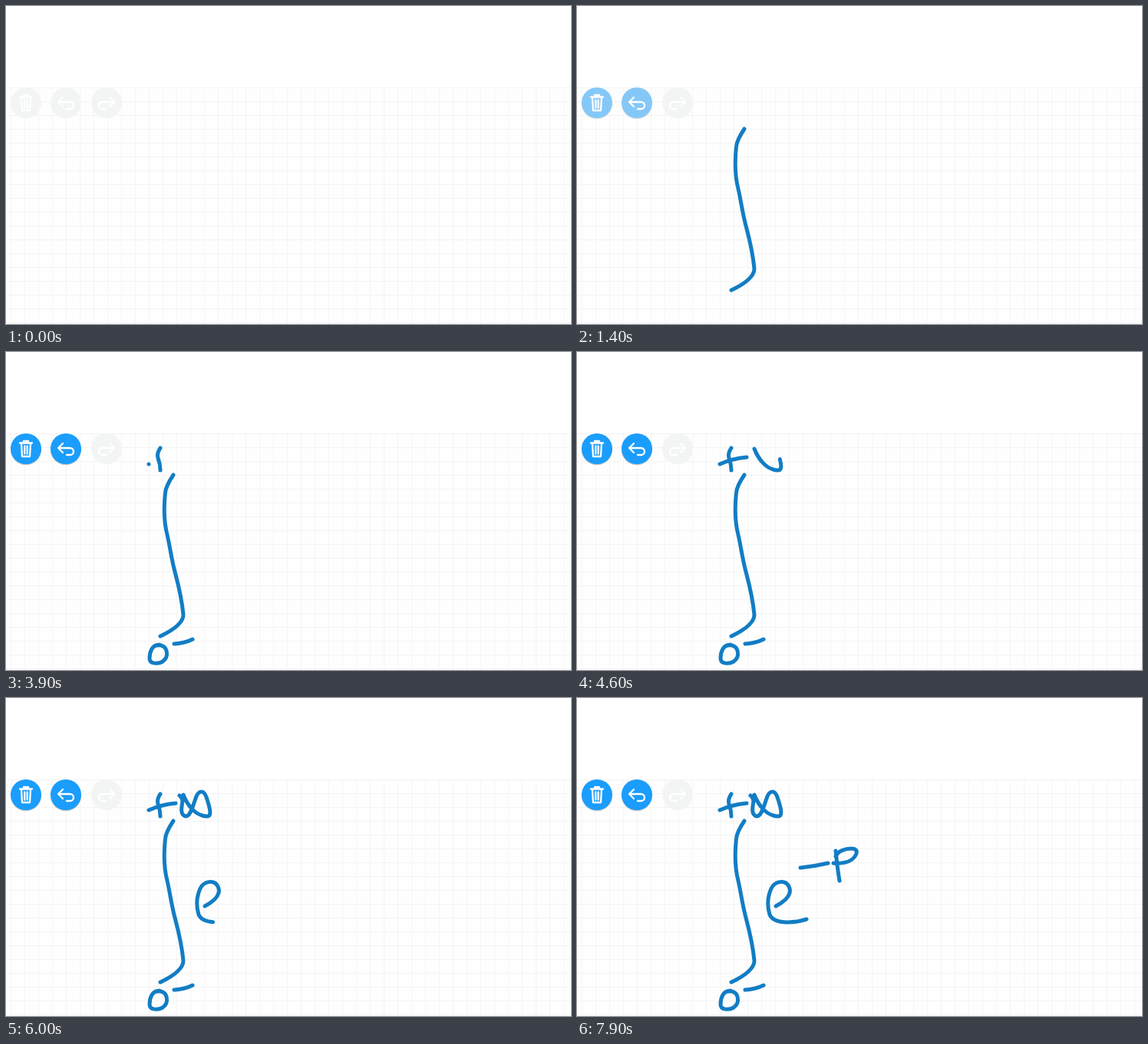
An HTML page that plays this animation: 736x414 px, repeating every 8000 ms.

```html
<!DOCTYPE html>
<html lang="en">
<head>
<meta charset="utf-8">
<title>Handwriting board</title>
<style>
  html, body { margin: 0; width: 100%; height: 100%; overflow: hidden; background: #fff; }
  svg { display: block; width: 100%; height: 100%; }
  path { fill: none; stroke-linecap: round; stroke-linejoin: round; }
  #ink path { stroke: #127dc4; stroke-width: 5; }
  .icon path { stroke: #fff; stroke-width: 2.3; }
</style>
</head>
<body>
<svg viewBox="0 0 736 414">
  <defs>
    <g id="trash" class="icon">
      <path d="M18 118.5H34M23 118V116H29V118M20 119L21 136H31L32 119M24.3 122.5V132.5M27.7 122.5V132.5"/>
    </g>
    <g id="arrow" class="icon">
      <path d="M74 119L68 125L74 131M68 125H83.5A4.5 4.5 0 0 1 83.5 134H79"/>
    </g>
  </defs>
  <rect y="106" width="736" height="308" fill="#fefefe"/>
  <path id="columns" stroke="#f5f5f5" stroke-linecap="butt"/>
  <path id="rows" stroke="#f3f3f3" stroke-linecap="butt"/>
  <g fill="#f3f5f5">
    <circle cx="26" cy="126" r="20"/>
    <circle cx="78" cy="126" r="20"/>
    <circle cx="131" cy="126" r="20"/>
  </g>
  <g id="active" fill="#1a9dfc">
    <g fill="#000" opacity=".2">
      <circle cx="26" cy="127.3" r="20"/>
      <circle cx="78" cy="127.3" r="20"/>
    </g>
    <circle cx="26" cy="126" r="20"/>
    <circle cx="78" cy="126" r="20"/>
  </g>
  <use href="#trash"/>
  <use href="#arrow"/>
  <use href="#arrow" transform="translate(209) scale(-1 1)"/>
  <g id="ink"></g>
</svg>
<script>
const LOOP = 8000, STEP = 100, CELL = 18;
const byId = id => document.getElementById(id);

let rows = '', columns = '';
for (let y = 106.5; y < 414; y += CELL) rows += `M0 ${y}H736`;
for (let x = 6.5; x < 736; x += CELL) columns += `M${x} 106V414`;
byId('rows').setAttribute('d', rows);
byId('columns').setAttribute('d', columns);

// Pen touches at `down`, moves from `from`, and is complete at `to` (ms).
const strokes = [
  { down: 600, from: 800, to: 1300, d: 'M218 160Q208 175 207.5 183C205 205 206 222 210 238C214 255 215 268 221 290C225 305 229 322 231 342C231 352 220 361 201 370' },
  { down: 2100, from: 2100, to: 2400, d: 'M200 381C190 381 187 391 187 399C187 407 199 406 204 403C208 400 210 396 209.5 392C209 383 202 380 193 383' },
  { down: 2700, from: 2800, to: 2900, d: 'M219 380Q233 379 243 374' },
  { down: 3600, from: 3800, to: 3800, d: 'M201 125Q196 132 198 138Q201 146 201 154' },
  { down: 3900, from: 4100, to: 4100, d: 'M186 146Q201 139 221 137' },
  { down: 4300, from: 4500, to: 4900, d: 'M231 126C236 139 247 154 262 154C269 154 265 141 261 129C257 119 251 121 248 128C244 138 241 154 234 154C226 152 229 141 230 134Q229 129 226 127' },
  { down: 5500, from: 5700, to: 6100, d: 'M259 271C272 264 279 256 277 248C273 235 258 238 253 248C248 259 248 272 251 282C256 294 280 294 299 288' },
  { down: 6600, from: 6800, to: 6800, d: 'M291 221Q310 219 327 215' },
  { down: 7300, from: 7400, to: 7500, d: 'M337 199Q339 221 342 238' },
  { down: 7600, from: 7700, to: 7900, d: 'M337 206C340 199 350 196 357 196C369 196 364 206 357 211Q349 216 334 215' }
];

for (const stroke of strokes) {
  stroke.path = document.createElementNS('http://www.w3.org/2000/svg', 'path');
  stroke.path.setAttribute('d', stroke.d);
  stroke.path.setAttribute('pathLength', 1);
  byId('ink').append(stroke.path);
}

function draw(time) {
  const t = Math.floor(time % LOOP / STEP) * STEP;
  for (const { path, down, from, to } of strokes) {
    const progress = t < from ? 0 : Math.min(1, (t - from + STEP) / (to - from + STEP));
    path.style.visibility = t < down ? 'hidden' : 'visible';
    path.style.strokeDasharray = `${Math.max(progress, .001)} 2`;
  }
  byId('active').style.opacity = t < 1400 ? 0 : t < 1500 ? .5 : 1;
}

const start = performance.now();
function tick() {
  draw(performance.now() - start);
  requestAnimationFrame(tick);
}
tick();
</script>
</body>
</html>
```
